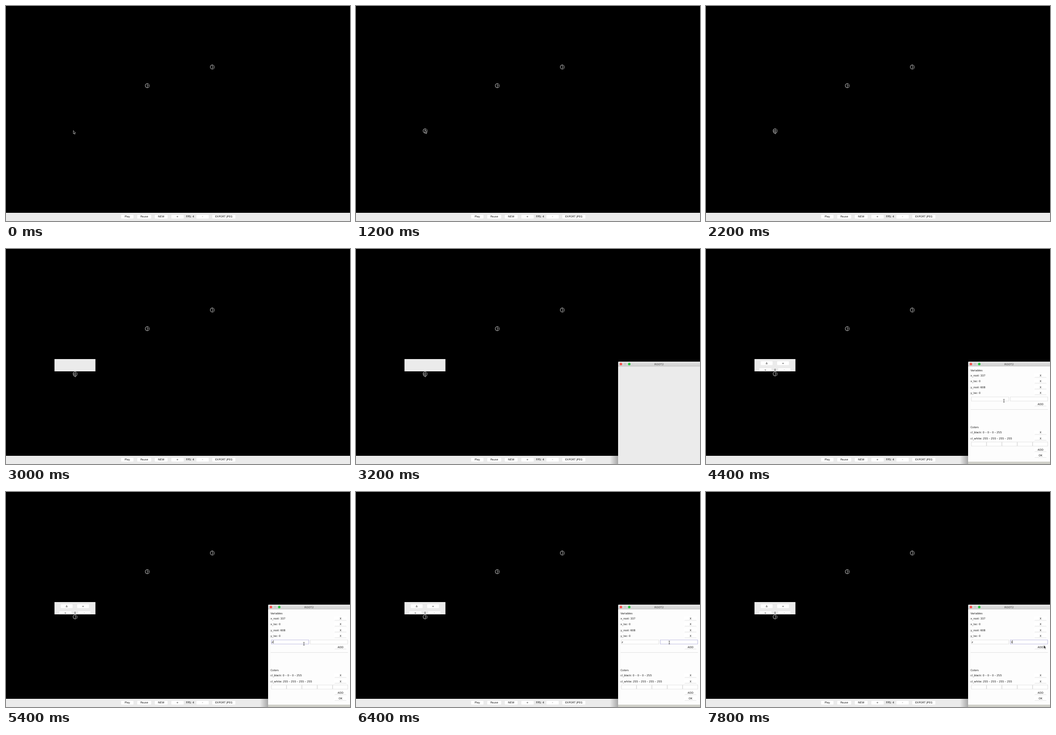
Recreate the animation shown at these times as an HTML page. Size 672x420 px, loop 8000 ms.

```html
<!DOCTYPE html>
<html lang="en">
<head>
<meta charset="utf-8">
<title>Node editor</title>
<style>
html, body { margin: 0; width: 100%; height: 100%; overflow: hidden; background: #000; }
svg { display: block; width: 100vw; height: 100vh; }
text { font: 5.15px "DejaVu Sans", sans-serif; fill: #111; }
</style>
</head>
<body>
<svg id="stage" viewBox="0 0 672 420">
  <defs>
    <linearGradient id="head" x1="0" y1="0" x2="0" y2="1">
      <stop offset="0" stop-color="#e4e4e4"/><stop offset="1" stop-color="#cfcfcf"/>
    </linearGradient>
    <linearGradient id="shade">
      <stop offset="0" stop-color="#777" stop-opacity="0"/><stop offset="1" stop-color="#777" stop-opacity=".6"/>
    </linearGradient>
  </defs>
</svg>
<script>
const LOOP = 8000, STEP = 200;
const GREY = '#ebebeb', PAPER = '#fdfdfd', LINE = '#dedede', EDGE = '#cfcfc8', RING = '#b4b2dc';
const stage = document.getElementById('stage');

function add(parent, tag, attrs, body) {
  const el = document.createElementNS('http://www.w3.org/2000/svg', tag);
  for (const k in attrs) el.setAttribute(k, attrs[k]);
  if (body !== undefined) el.textContent = body;
  parent.appendChild(el);
  return el;
}
const group = parent => add(parent, 'g', {});
const rect = (p, x, y, width, height, fill, more) => add(p, 'rect', { x, y, width, height, fill, ...more });
const path = (p, d, stroke, width, fill = 'none') =>
  add(p, 'path', { d, stroke, fill, 'stroke-width': width });
// y is the middle of the line of text
const label = (p, x, y, s, anchor = 'start') =>
  add(p, 'text', { x, y: y + 1.85, 'text-anchor': anchor }, s);

function button(p, cx, cy, w, s, edge) {
  rect(p, cx - w / 2, cy - 3.7, w, 7.4, '#fff', { rx: 1 });
  if (edge) path(p, `M${cx - w / 2 + 1} ${cy + 3.7}h${w - 2}`, edge, .8);
  label(p, cx, cy, s, 'middle');
}
function field(p, x, y, w) {
  return rect(p, x + .5, y + .5, w - 1, 8, '#fff', { stroke: LINE, 'stroke-width': .8 });
}
function node(x, y) {
  const g = add(stage, 'g', { transform: `translate(${x} ${y})` });
  path(g, 'M1.8 -3.6A4 4 0 1 0 1.8 3.6', '#a2a2a2', 1.1);
  path(g, 'M.2 -2.9H3.2L4 -2V2.2L3.2 3.2H.2M0 .1H3.8M.4 -2.6V2.8', '#8e8e8e', .9);
  return g;
}

// Bottom bar
rect(stage, 0, 404, 672, 16, GREY);
[[237, 24, 'Play'], [270, 27, 'Pause'], [303.2, 25, 'NEW'], [335, 24, '+'],
 [384, 24, '-'], [425.5, 45, 'EXPORT JPEG']]
  .forEach(([x, w, s]) => button(stage, x, 411.6, w, s));
label(stage, 359.5, 411.6, 'FPS: 4', 'middle');

node(403, 119.2);
node(276, 155.6);
const third = node(135, 243.8);

// Popup above the new node
const popup = group(stage);
rect(popup, 94.7, 215, 80, 24, GREY);
const popKeys = add(popup, 'svg', { x: 0, y: 0, width: 672, height: 239 });
button(popKeys, 118.5, 223, 23, 'Δ');
button(popKeys, 150.5, 223, 23, '+');
button(popKeys, 116, 236.6, 24, '+');
button(popKeys, 153, 236.6, 24, '-');
label(popKeys, 135, 236.6, '0', 'middle');

// Settings window
const win = group(stage);
rect(win, 496, 404, 16, 16, 'url(#shade)');
path(win, 'M512 420V222q0 -2 2 -2H672V420z', 'none', 0, GREY);
path(win, 'M512 229V222q0 -2 2 -2H672V229z', 'none', 0, 'url(#head)');
path(win, 'M512 229.2H672', '#b8b8b8', .6);
[[517.5, '#f9524c'], [525.6, '#cccccc'], [533.8, '#2bc840']]
  .forEach(([cx, fill]) => add(win, 'circle', { cx, cy: 224.7, r: 2.5, fill }));
label(win, 592, 225, 'ROOT2', 'middle').setAttribute('fill-opacity', .75);

const form = group(win);
rect(form, 512, 229.5, 160, 186, PAPER);
rect(form, 512, 415.5, 160, 4.5, EDGE);
label(form, 516.7, 237, 'Variables');
label(form, 516.7, 348, 'Colors');
[[247, 'x_root: 337'], [258.4, 'x_loc: 0'], [269.8, 'y_root: 608'], [281, 'y_loc: 0'],
 [358.5, 'cl_black: 0 – 0 – 0 – 255'], [369.8, 'cl_white: 255 – 255 – 255 – 255']]
  .forEach(([y, s]) => {
    label(form, 516.7, y, s);
    button(form, 653.5, y, 25, 'X', LINE);
  });
[[303, 'ADD'], [392, 'ADD'], [403.5, 'OK']].forEach(([y, s]) => button(form, 653.5, y, 25, s, LINE));
path(form, 'M517 313.5H668', LINE, .8);
const boxes = [field(form, 518, 288.5, 74), field(form, 594, 288.5, 74)];
for (let i = 0; i < 5; i++) field(form, 518 + i * 30, 376.5, 30);
const nameText = label(form, 519, 293, 'z');
const valueText = label(form, 595.2, 293, '1');
const caret = rect(form, 0, 289.8, .7, 6, '#222');

// Pointers
const arrow = path(stage, 'M0 0V6.2L1.5 4.9L2.5 7.2L3.5 6.8L2.5 4.5H4.3Z', '#cfcfcf', .7, '#000');
const beam = path(stage, 'M-1.2 -3q1.2 0 1.2 .8q0 -.8 1.2 -.8M0 -2.2V2.2M-1.2 3q1.2 0 1.2 -.8q0 .8 1.2 .8', '#222', .7);

// time, x, y, text pointer?
const moves = [
  [0, 131.5, 243.3], [200, 133.4, 242.8], [400, 134.6, 242.4],
  [1800, 133.6, 243.4], [2000, 133, 243.6], [2200, 133, 242.8],
  [3600, 184, 250], [3800, 296, 264], [4000, 424, 281],
  [4200, 536, 293], [4400, 582, 296.5, 1],
  [5600, 604, 295, 1], [5800, 612, 294, 1],
  [7600, 643, 298], [7800, 660, 299.6]
];
const show = (el, on) => el.setAttribute('visibility', on ? 'inherit' : 'hidden');

function draw(time) {
  const t = Math.floor(time / STEP) * STEP;
  show(third, t >= 1200);
  show(popup, t >= 3000);
  show(popKeys, t >= 3400);
  show(win, t >= 3200);
  show(form, t >= 3400);

  const focus = t >= 5800 ? 1 : t >= 4600 ? 0 : -1;
  boxes.forEach((b, i) => b.setAttribute('stroke', i === focus ? RING : LINE));
  const named = t >= 5200, valued = t >= 7400;
  show(nameText, named);
  show(valueText, valued);
  const blinkOff = t === 5000 || (t >= 6200 && t < 6600) || (t >= 7000 && t < 7400);
  caret.setAttribute('x', focus === 1 ? (valued ? 598.3 : 595.4) : (named ? 521.8 : 519.2));
  caret.setAttribute('display', focus < 0 || blinkOff ? 'none' : 'inline');

  const [, x, y, text] = moves.filter(m => m[0] <= t).pop();
  const pointer = text ? beam : arrow;
  show(beam, text);
  show(arrow, !text);
  pointer.setAttribute('transform', `translate(${x} ${y})`);
}

const start = performance.now();
function tick() {
  draw((performance.now() - start) % LOOP);
  requestAnimationFrame(tick);
}
tick();
</script>
</body>
</html>
```
